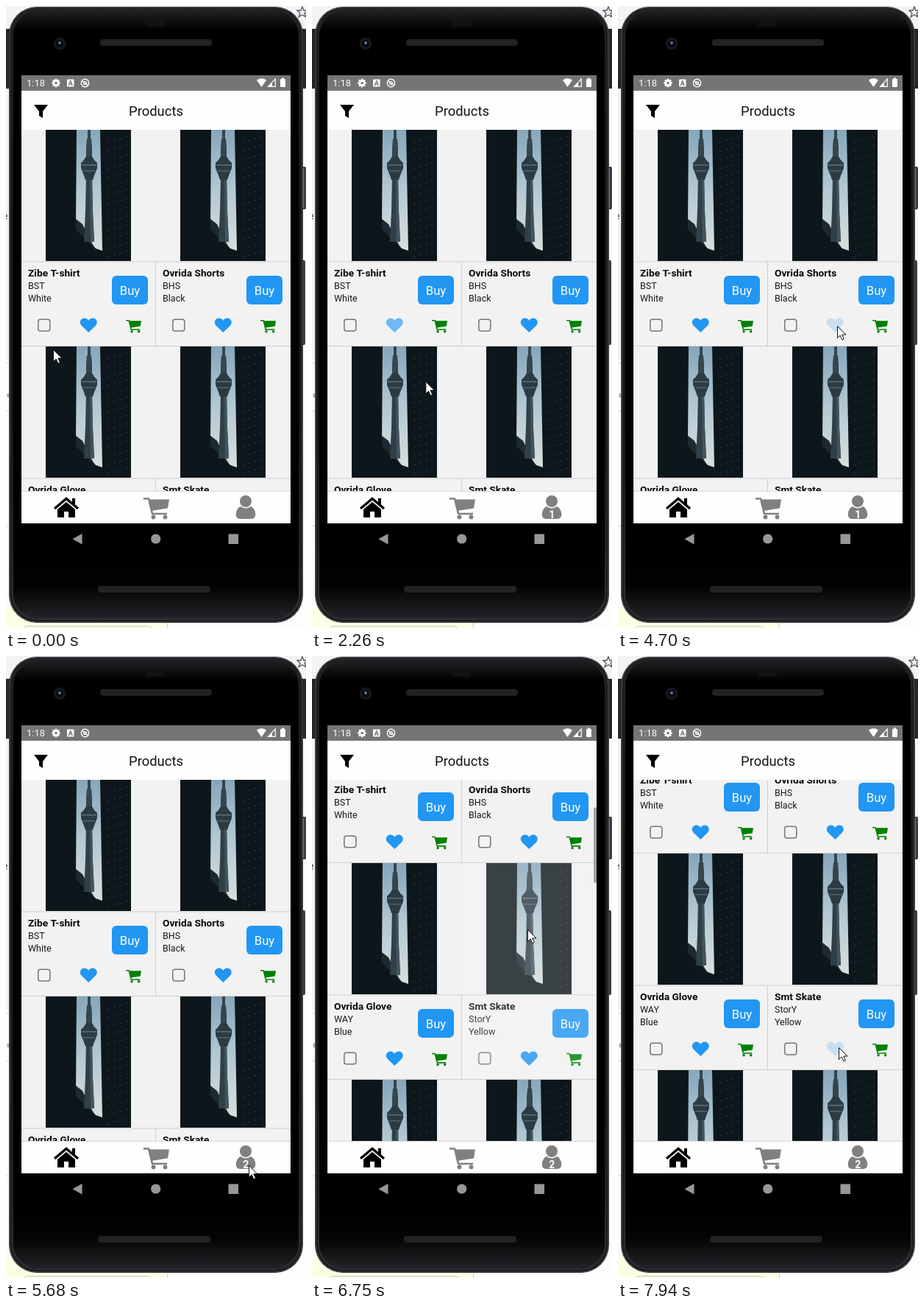
Write an HTML page with a canvas that moves like this. It is 408 px wide and 844 px high and loops after 7.99 s.

```html
<!DOCTYPE html>
<html lang="en">
<head>
<meta charset="utf-8">
<title>Product list</title>
<style>
html, body { margin: 0; width: 100%; height: 100%; overflow: hidden; background: #f8f8f8; }
canvas { display: block; width: 408px; height: 844px; }
</style>
</head>
<body>
<canvas id="stage" width="408" height="844"></canvas>
<script>
const ctx = document.getElementById('stage').getContext('2d');
const LOOP = 7990;
const PAPER = '#f2f2f2', WHITE = '#fefefe', BLUE = '#2196f3', GREEN = '#008000', GRAY = '#808080', LINE = '#cfcfcf';
const TOP = 168, BOTTOM = 658, ROW = 294, COL = 183;

const products = [
  ['Zibe T-shirt', 'BST', 'White'], ['Ovrida Shorts', 'BHS', 'Black'],
  ['Ovrida Glove', 'WAY', 'Blue'], ['Smt Skate', 'StorY', 'Yellow'],
  ['', '', ''], ['', '', '']
];

// time, x, y
const pointerKeys = [
  [130, 64, 466], [600, 99, 432], [800, 108, 431], [2080, 108, 432], [2260, 154, 509],
  [2540, 300, 682], [2760, 331, 708], [3100, 335, 714], [3370, 330, 692], [3900, 328, 690],
  [4190, 312, 628], [4500, 298, 434], [5000, 298, 434], [5400, 330, 690], [5900, 330, 691],
  [6300, 298, 570], [6400, 298, 568], [6530, 298, 511], [6750, 293, 371], [6900, 293, 367],
  [7150, 294, 378], [7600, 300, 531]
];
const scrollKeys = [[6545, 0], [6650, 105], [6750, 181], [6950, 194]];
const heartPresses = [[0, 1780, 2130], [1, 4550, 4950], [3, 7740, 9000]];
const cardPress = [3, 6300, 6580];
const badgeTimes = [2130, 4990];

const clamp = v => Math.max(0, Math.min(1, v));
const smooth = v => { v = clamp(v); return v * v * (3 - 2 * v); };

// Monotone cubic curve through the keys: flows through points without overshoot
function track(keys, t, i) {
  const last = keys.length - 1;
  if (t <= keys[0][0]) return keys[0][i];
  if (t >= keys[last][0]) return keys[last][i];
  const slope = k => k < 0 || k >= last ? 0 : (keys[k + 1][i] - keys[k][i]) / (keys[k + 1][0] - keys[k][0]);
  const tangent = k => {
    const a = slope(k - 1), b = slope(k);
    return a * b > 0 ? 2 * a * b / (a + b) : 0;
  };
  const k = keys.findIndex(key => t < key[0]) - 1;
  const h = keys[k + 1][0] - keys[k][0], u = (t - keys[k][0]) / h, v = 1 - u;
  return keys[k][i] + (keys[k + 1][i] - keys[k][i]) * smooth(u)
    + h * u * v * (v * tangent(k) - u * tangent(k + 1));
}

// How much of the paper shows through a pressed item
const veilAt = (t, from, to) => 0.8 * smooth((t - from) / 150) * (1 - smooth((t - to) / 250));

function rect(x, y, w, h, color, c = ctx) {
  c.fillStyle = color;
  c.fillRect(x, y, w, h);
}
function round(x, y, w, h, r, color, line = 0) {
  ctx.beginPath();
  ctx.roundRect(x, y, w, h, r);
  paint(color, line);
}
function disc(x, y, r, color, line = 0) {
  ctx.beginPath();
  ctx.arc(x, y, r, 0, Math.PI * 2);
  paint(color, line);
}
function paint(color, line) {
  if (line) { ctx.lineWidth = line; ctx.strokeStyle = color; ctx.stroke(); }
  else { ctx.fillStyle = color; ctx.fill(); }
}
function shape(d, color, line = 0, c = ctx) {
  const p = new Path2D(d);
  if (line) { c.lineWidth = line; c.strokeStyle = color; c.stroke(p); }
  else { c.fillStyle = color; c.fill(p); }
}
function text(s, x, y, size, color, weight = 400, align = 'left') {
  ctx.font = `${weight} ${size}px Roboto, sans-serif`;
  ctx.textAlign = align;
  ctx.fillStyle = color;
  ctx.fillText(s, x, y);
}
function fade(c, y0, y1, ...stops) {
  const g = c.createLinearGradient(0, y0, 0, y1);
  stops.forEach((color, i) => g.addColorStop(i / (stops.length - 1), color));
  return g;
}

function makePhoto() {
  const cv = document.createElement('canvas');
  cv.width = 116;
  cv.height = 178;
  const c = cv.getContext('2d');
  rect(0, 0, 116, 178, '#0d171b', c);
  for (let y = 6; y < 165; y += 12) {
    for (let x = 84; x < 114; x += 8) rect(x, y + (116 - x) * 0.3, 3, 2, 'rgba(110,125,130,.16)', c);
  }
  shape('M42 0H74L77 164L68 161L41 130Z', fade(c, 0, 165, '#86a6bb', '#b4c9d3', '#d8dfdd'), 0, c);
  shape('M41 121L50 128L53 134V148L62 152L67 161L41 135Z', '#1c2a30', 0, c);
  shape('M57 0H61V12H62L63 24V38H55V24L56 12H57Z', '#34454e', 0, c);
  shape('M55 62H63L64 110L66 152H52L54 110Z', '#2f4049', 0, c);
  shape('M60 62H63L64 110L66 152H61Z', '#42545d', 0, c);
  shape('M55 36H63L66 41L70 45V52L68 57L66 62L64 68H54L52 62L50 57L48 52V45L52 41Z', '#2b3b44', 0, c);
  rect(49, 47, 20, 1.5, '#5c7078', c);
  rect(51, 55, 16, 1.5, '#50646d', c);
  return cv;
}
const photo = makePhoto();

function cart(x, y, scale, color) {
  ctx.save();
  ctx.translate(x, y);
  ctx.scale(scale, scale);
  ctx.lineJoin = 'round';
  shape('M0 2H7L12 22.5H32', color, 2.6);
  shape('M8 3H35L33 15L11 18.5Z', color);
  disc(13.5, 27, 2.9, color);
  disc(29.5, 27, 2.9, color);
  ctx.restore();
}

function heart(x, y) {
  ctx.save();
  ctx.translate(x, y);
  shape('M0 10L-9.5 .8C-14 -4 -10 -9.5 -6 -9.5C-3 -9.5 -1 -8 0 -6C1 -8 3 -9.5 6 -9.5C10 -9.5 14 -4 9.5 .8Z', BLUE);
  ctx.restore();
}

function backdrop() {
  rect(0, 0, 408, 844, '#eef6ec');
  rect(0, 0, 408, 31, '#f5f2f6');
  rect(0, 31, 408, 81, '#272527');
  rect(400, 112, 8, 732, '#fafafa');
  rect(0, 480, 6, 364, '#fbfbf8');
  rect(0, 815, 219, 29, '#fcffe4');
  rect(219, 700, 189, 144, '#fdfdfd');
  rect(219, 836, 1, 8, '#cccccc');
  round(24.5, 841.5, 173, 10, 4, '#c4c4c4', 1);
  shape('M403 1L405 6L410 6L406 10L408 15L403 12L398 15L400 10L396 6H401Z', '#55555a', 1.3);
  text('e', -5, 290, 14, '#444444');
  text('s', 1, 531, 9, '#444444');
  for (const y of [112, 484, 549, 705]) rect(0, y, 6, 1, '#d6d6d6');
  round(402, 218, 6, 58, 2, '#3d3d40');
  round(402, 345, 5, 115, 2, '#3d3d40');
  rect(403, 220, 2, 54, '#77777c');
  rect(403, 347, 1, 111, '#77777c');
}

function phone() {
  round(4, 1, 400, 836, 38, '#1d1d20');
  round(5, 2, 398, 834, 37, '#55555a', 1);
  round(8, 4, 392, 829, 35, fade(ctx, 4, 833, '#242427', '#121214', '#121214', '#303035'));
  round(10, 6, 388, 825, 34, fade(ctx, 6, 34, '#202023', '#000'));
  round(10, 740, 388, 91, [0, 0, 34, 34], fade(ctx, 748, 831, '#000', '#040405', '#242428'));
  rect(191, 19, 25, 9, '#121214');
  round(128, 45, 152, 9, 4, '#222224');
  round(125, 787, 153, 9, 4, '#222224');
  disc(73, 51, 8.5, '#16161b');
  disc(73, 51, 5, '#070a14');
  disc(73, 50, 1.9, '#6478a8');
}

function statusBar() {
  rect(21, 94, 366, 21, '#757575');
  text('1:18', 28, 109, 13, WHITE);
  for (let i = 0; i < 8; i++) {
    ctx.save();
    ctx.translate(68, 104.5);
    ctx.rotate(i * Math.PI / 4);
    rect(-1.2, -5.8, 2.4, 4, WHITE);
    ctx.restore();
  }
  disc(68, 104.5, 3.2, WHITE, 2.4);
  round(83, 99.5, 9.5, 10, 1, WHITE);
  text('A', 87.8, 108, 9, '#666666', 700, 'center');
  disc(107.5, 104.5, 5.2, WHITE, 1.4);
  disc(107.5, 104.5, 2, WHITE, 1.2);
  shape('M103 101L112 108', WHITE, 1.2);
  shape('M341 100.5Q347.5 96 354 100.5L347.5 110Z', WHITE);
  shape('M366.3 99V109.3H356.5Z', WHITE, 1.2);
  shape('M362 104V109H357Z', WHITE);
  round(373, 99, 7, 11, 1, WHITE);
  rect(375, 97.5, 3, 2, WHITE);
}

function header() {
  rect(21, 115, 366, 53, WHITE);
  text('Products', 204, 149, 18.4, '#141414', 400, 'center');
  shape('M38 134H57L50 143V152L45 149V143Z', '#000');
}

function veil(x, y, w, h, alpha) {
  ctx.globalAlpha = alpha;
  rect(x, y, w, h, PAPER);
  ctx.globalAlpha = 1;
}

function card(i, t) {
  const [name, kind, color] = products[i];
  const x = (i % 2) * COL, y = Math.floor(i / 2) * ROW;
  ctx.save();
  ctx.translate(x, y);
  ctx.drawImage(photo, 54, 168);
  rect(21, 346.5, 183, 1, LINE);
  rect(21, 461, 183, 1, LINE);
  text(name, 30, 367, 13.7, '#080808', 700);
  text(kind, 30, 384, 12.5, '#181818');
  text(color, 30, 401, 12.5, '#181818');
  round(144, 366, 49, 39, 6, BLUE);
  text('Buy', 168.5, 392, 16.6, WHITE, 400, 'center');
  round(43.8, 425.3, 16, 15.6, 3, '#757575', 1.5);
  heart(112.3, 433);
  for (const [item, from, to] of heartPresses) if (item === i) veil(99, 421, 27, 24, veilAt(t, from, to));
  cart(163, 425.5, 0.6, GREEN);
  const [item, from, to] = cardPress;
  if (item === i) veil(21, 168, 183, 293, veilAt(t, from, to));
  if (x === 0) rect(203, 347, 1, 114, LINE);
  ctx.restore();
}

function list(t) {
  const scroll = track(scrollKeys, t, 1);
  ctx.save();
  ctx.beginPath();
  ctx.rect(21, TOP, 366, BOTTOM - TOP);
  ctx.clip();
  rect(21, TOP, 366, BOTTOM - TOP, PAPER);
  ctx.translate(0, -scroll);
  products.forEach((_, i) => card(i, t));
  ctx.restore();
  if (scroll > 0) {
    ctx.globalAlpha = 0.62 * (1 - clamp((t - 7220) / 250));
    rect(383, TOP + scroll * 0.208, 4, 102, '#757575');
    ctx.globalAlpha = 1;
  }
}

function tabs(t) {
  rect(21, BOTTOM, 366, 44, WHITE);
  rect(21, BOTTOM, 366, 1, '#d8d8d8');
  shape('M66 682L82 668.5L98 682', '#000', 3.4);
  shape('M70 683L82 673L94 683V694H85V686H79V694H70Z', '#000');
  rect(90, 668, 4, 8, '#000');
  cart(187, 666.5, 1, GRAY);
  shape('M319 679Q326 684 333 679C338 681 340 688 339 692Q338 696 333 696H319Q314 696 313 692C312 688 314 681 319 679Z', GRAY);
  disc(326, 672, 8, GRAY);
  const count = badgeTimes.filter(b => t >= b).length;
  if (count) text(count, 326.2, 694.5, 14, WHITE, 700, 'center');
}

function navBar() {
  rect(21, 702, 366, 42, '#000');
  shape('M103.5 716V730.5L90.5 723.2Z', '#979797');
  disc(203.7, 723, 6.6, '#979797');
  rect(302.5, 716.5, 13.5, 13.5, '#979797');
}

function pointer(t) {
  ctx.save();
  ctx.translate(track(pointerKeys, t, 1), track(pointerKeys, t, 2));
  const d = 'M.5 .5V16.5L4.2 13L6.8 19L9.4 17.9L6.8 12H12Z';
  shape(d, '#fff');
  shape(d, '#111', 1);
  ctx.restore();
}

function draw(t) {
  backdrop();
  phone();
  statusBar();
  header();
  list(t);
  tabs(t);
  navBar();
  pointer(t);
}

const start = performance.now();
function tick() {
  draw((performance.now() - start) % LOOP);
  requestAnimationFrame(tick);
}
tick();
</script>
</body>
</html>
```
